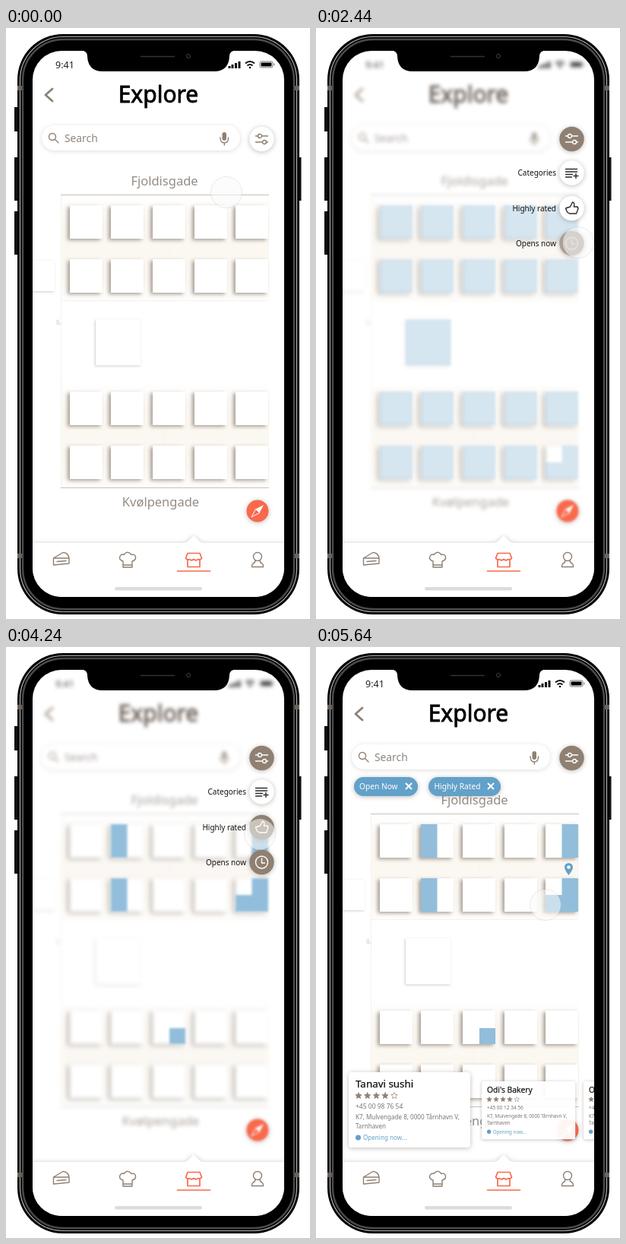
These frames come from a looping animation (400 by 777 pixels, 7.48 s). An HTML page:

```html
<!DOCTYPE html>
<html lang="en">
<head>
<meta charset="utf-8">
<title>Explore map filters</title>
<style>
html, body { margin: 0; width: 100%; height: 100%; overflow: hidden; background: #fff; }
svg { display: block; width: 400px; height: 777px; font-family: "Noto Sans", "Open Sans", sans-serif; }
.line { fill: none; stroke: #8f8072; stroke-width: 1.4; stroke-linecap: round; stroke-linejoin: round; }
.shadow { filter: drop-shadow(0 1px 3px rgba(60, 50, 40, .32)); }
.tiles { fill: #fff; filter: drop-shadow(-3px 2px 2.5px rgba(85, 72, 58, .5)); }
.faint { fill: #fff; filter: drop-shadow(-1px 1px 1.5px rgba(85, 72, 58, .28)); }
.blue { fill: #92bedb; }
.street { font-size: 16.5px; fill: #958b83; text-anchor: middle; }
.label { font-size: 10px; fill: #111; text-anchor: end; }
.small { font-size: 8.1px; fill: #777; }
</style>
</head>
<body>
<svg viewBox="0 0 400 777">
  <defs>
    <clipPath id="screen"><rect x="35" y="30" width="331" height="718" rx="38"/></clipPath>
    <linearGradient id="ground" x2="0" y2="1">
      <stop offset="0" stop-color="#fff"/><stop offset=".25" stop-color="#fbf7f1"/>
      <stop offset=".8" stop-color="#fbf7f1"/><stop offset="1" stop-color="#fefdfb"/>
    </linearGradient>
  </defs>

  <!-- phone body -->
  <path d="M13 104V136M13 170V227M13 241V298M386.500 170V227" stroke="#111" stroke-width="4"/>
  <rect x="15" y="8" width="371" height="763" rx="60"/>
  <g fill="none">
    <rect x="18.500" y="11.500" width="364" height="756" rx="57" stroke="#b5b5b5" stroke-width="1.200"/>
    <rect x="22" y="15" width="357" height="749" rx="53.500" stroke="#4a4a4a" stroke-width="2.500"/>
  </g>
  <path d="M15 79H21M380 79H386M15 694H21M380 694H386" stroke="#6d6259" stroke-width="6"/>
  <rect x="35" y="30" width="331" height="718" rx="38" fill="#fff"/>

  <g clip-path="url(#screen)">
    <g id="page">
      <text x="65" y="53" font-size="12.500" fill="#222">9:41</text>
      <path d="M294 53v-3M298 53v-5M302.500 53v-7M307 53v-9" stroke="#111" stroke-width="3"/>
      <path d="M315 46.500q6-5 12 0M317.500 49.500q3.500-3 7 0" fill="none" stroke="#111" stroke-width="2"/>
      <circle cx="321" cy="52" r="1.300"/>
      <rect x="334" y="44" width="17" height="8" rx="2" fill="none" stroke="#777"/>
      <rect x="335.500" y="45.500" width="14" height="5" rx="1"/><path d="M353 46.500v3" stroke="#777"/>
      <path d="M61 80L52 88L61 96" class="line" style="stroke-width:2.800"/>
      <text id="heading" x="200.500" y="98" font-size="30" stroke-width=".8" text-anchor="middle">Explore</text>

      <rect x="47" y="128" width="261" height="33" rx="16.500" fill="#fff" class="shadow" opacity=".5"/>
      <circle cx="61" cy="143" r="4.500" class="line"/><path d="M64.500 146.500L69 151" class="line"/>
      <text x="77" y="150" font-size="13.800" fill="#8f857d">Search</text>
      <rect x="284.500" y="137" width="5.500" height="11" rx="2.700" fill="#8f8072"/>
      <path d="M282 144q0 7 5.300 7t5.300-7M287.300 151v3" class="line"/>

      <rect x="73" y="222" width="273" height="136" fill="url(#ground)"/>
      <rect x="73" y="466" width="273" height="137" fill="url(#ground)"/>
      <path d="M72 219.500H346M72 604.500H346" stroke="#c8c0b8"/>
      <path d="M72.500 220V604M73 358.500H346M215.500 282V300M207.500 527V546" stroke="#f6f2ed" fill="none"/>
      <path d="M67 384v6M69 383v8M71 387v3" stroke="#ccc" stroke-width=".8"/>
      <text x="208.500" y="207" class="street">Fjoldisgade</text>
      <text x="203.500" y="629" class="street">Kvølpengade</text>
      <g class="tiles" id="tiles"></g>
      <g class="faint">
        <rect x="20" y="306" width="44" height="40"/>
        <rect x="118" y="383" width="59.500" height="60.500"/>
      </g>
    </g>

    <g id="blueMap">
      <path id="kept" class="blue" d="M138 233h21.500v44h-21.500zM323.500 233h21.500v44h-21.500zM138 304h21.500v44h-21.500zM302 326h21.500v-22h21.500v44h-43zM215 501h21v21h-21z"/>
      <g id="all" class="blue"></g>
    </g>

    <g id="compass">
      <circle cx="331" cy="635" r="14.500" fill="#f9694c" class="shadow"/>
      <path d="M339 627L333.500 637.500L328.500 632.500Z" fill="#fff"/>
      <path d="M323 643L328.500 632.500L333.500 637.500Z" fill="none" stroke="#fff"/>
    </g>

    <g id="results">
      <g fill="#62a1c9" class="shadow">
        <rect x="50" y="171" width="84" height="25" rx="12.500"/>
        <rect x="148" y="171" width="95" height="25" rx="12.500"/>
      </g>
      <g fill="#fff" font-size="10.200"><text x="57" y="187">Open Now</text><text x="155.500" y="187">Highly Rated</text></g>
      <path d="M118 179l8 8m0-8l-8 8M226 179l8 8m0-8l-8 8" stroke="#fff" stroke-width="2"/>
      <path d="M332.500 300Q327 293 327 289.500a5.500 5.500 0 0 1 11 0Q338 293 332.500 300Z" fill="#62a1c9"/>
      <circle cx="332.500" cy="289.500" r="2.300" fill="#fff"/>
      <g id="cards"></g>
    </g>

    <!-- tab bar -->
    <path d="M30 677H233Q238 677 241 673L245 669Q247 667 249 669L253 673Q256 677 261 677H372V760H30Z" fill="#fff" class="shadow"/>
    <g class="line">
      <path d="M62.500 697L75 689.500Q82 690 83 697ZM62.500 697V706L83 704V697M67 701.500L79 700.500"/>
      <path d="M154 701Q148 699 150 694.500Q152 691 155 692.500Q160 686 165 692.500Q169 691 170.500 695Q171 700 166 701V709H154ZM154 706H166"/>
      <circle cx="331" cy="695" r="5.500"/>
      <path d="M328 700Q328 703 325 704Q323 706 323.500 708.500H338.500Q339 706 337 704Q334 703 334 700"/>
      <path stroke="#f9694c" stroke-width="1.700" d="M239 690.500H255L257.500 697Q256 700 252.500 698.500Q250 701 247 698.500Q244 701 241.500 698.500Q238 700 236.500 697ZM239 700V708.500H255V700M225.500 714H268.500"/>
    </g>
    <rect x="143" y="735" width="115" height="4.500" rx="2.200" fill="#dcdcdc"/>

    <g id="menu"></g>
    <circle id="cursor" r="20.500" fill="rgba(250,250,250,.55)" stroke="rgba(0,0,0,.1)" stroke-width=".8"/>
  </g>

  <path d="M98 29Q107 30 107 37Q108 57 127 57H274Q293 57 294 37Q294 30 303 29Z"/>
  <path d="M177 37.500H222" stroke="#333" stroke-width="1.500"/>
  <circle cx="240" cy="37" r="2.500" fill="none" stroke="#444"/>
</svg>

<script>
const $ = id => document.getElementById(id);
const LOOP = 7480, STEP = 40;

// map tiles
const cols = [84, 138, 193, 248, 302], rows = [233, 304, 478, 549];
const rect = (x, y, w, h) => `<rect x="${x}" y="${y}" width="${w}" height="${h}"/>`;
const tiles = rows.flatMap(y => cols.map(x => rect(x, y, 43, 44)));
$('tiles').innerHTML = tiles.join('');
$('all').innerHTML = tiles.slice(0, -1).join('') + rect(118, 383, 59.5, 60.5) +
  '<path d="M302 571h21.500v-22h21.500v44h-43z"/>';

// result cards
function star(cx, cy, filled) {
  const pts = Array.from({ length: 10 }, (_, i) => {
    const a = i * Math.PI / 5, r = i % 2 ? 2 : 4.4;
    return `${cx + r * Math.sin(a)},${cy - r * Math.cos(a)}`;
  });
  return `<polygon points="${pts.join(' ')}" fill="${filled ? '#8f8072' : '#fff'}" stroke="#8f8072" stroke-width=".7"/>`;
}
const card = (x, y, scale, name, phone) => `
  <g transform="translate(${x} ${y}) scale(${scale})">
    <rect width="160" height="99" rx="4" fill="#fff" class="shadow" opacity="${scale < 1 ? .94 : 1}"/>
    <text x="9" y="20" font-size="13.400" fill="#111" stroke="#111" stroke-width=".25">${name}</text>
    ${[13, 24.7, 36.4, 48, 60].map((sx, i) => star(sx, 31, i < 4)).join('')}
    <text x="9" y="48" class="small" style="font-size:8.500px">${phone}</text>
    <text x="9" y="62" class="small">K7, Mulvengade 8, 0000 Tårnhavn V,</text>
    <text x="9" y="73.500" class="small">Tarnhaven</text>
    <circle cx="12.500" cy="86" r="3.500" fill="#62a1c9"/>
    <text x="19" y="89" class="small" style="fill:#62a1c9">Opening now...</text>
  </g>`;
$('cards').innerHTML =
  card(218, 571, .77, "Odi's Bakery", '+45 00 12 34 56') +
  card(352, 571, .77, 'Orvel Café', '+45 00 23 45 67') +
  card(43, 559, 1, 'Tanavi sushi', '+45 00 98 76 54');

// round buttons: y, label, icon, [active from, to], [shown from, to], [hidden from, to]
const buttons = [
  [146, '', '<path d="M-8-4h3M0-4h8M-8 4h9M6 4h2"/><circle cx="-2.500" cy="-4" r="2.500"/><circle cx="3.500" cy="4" r="2.500"/>', [680, 800]],
  [190.5, 'Categories', '<path d="M-8-5h15M-8-1.500h15M-8 2h9M-8 5.500h8M2.500 4h6M5.500 1v6"/>', null, [1120, 1200], [5400, 5480]],
  [237, 'Highly rated', '<path d="M-8 0L-2-2L1-8Q4-8 3-2H7Q9-1 8 2L6 7H-3L-6 5Z"/>', [3760, 3880], [1240, 1320], [5280, 5360]],
  [283, 'Opens now', '<circle r="8"/><path d="M0-5V1H4"/>', [2360, 2480], [1360, 1440], [5160, 5240]]
];
$('menu').innerHTML = buttons.map(([y, label, icon]) => `
  <g>
    <text x="316" y="${y + 3.5}" class="label">${label}</text>
    <g transform="translate(336.500 ${y})">
      <circle r="16.200" class="shadow"/><g class="line">${icon}</g>
    </g>
  </g>`).join('');
const buttonEls = [...$('menu').children];

const mix = (a, b, p) => a + (b - a) * p;
const mixColor = (a, b, p) => `rgb(${a.map((v, i) => Math.round(mix(v, b[i], p)))})`;
const WHITE = [255, 255, 255], BROWN = [143, 128, 114], DARK = [45, 42, 40];
const BLACK = [0, 0, 0], UMBER = [66, 52, 42];

// progress of a change whose first visible step falls on `from`
const ramp = (t, [from, to]) => Math.min(1, Math.max(0, (t - from + STEP) / (to - from + STEP)));

const moves = [
  [40, 520, 336, 146], [680, 1400, 366, 178], [1600, 2320, 345, 282],
  [3200, 3880, 337, 238], [4240, 4960, 302, 339]
];
function cursorAt(t) {
  let x = 290, y = 216;
  for (const [from, to, nx, ny] of moves) {
    const p = Math.sin(ramp(t, [from, to]) * Math.PI / 2);
    x = mix(x, nx, p);
    y = mix(y, ny, p);
  }
  return [x, y];
}

function draw(now) {
  let t = now % LOOP;
  t -= t % STEP;

  const blur = ramp(t, [680, 960]) - ramp(t, [5480, 5640]);
  const soften = (id, px) => $(id).style.filter = blur > 0 ? `blur(${px * blur}px)` : 'none';
  soften('page', 2.6);
  soften('blueMap', 1.5);
  soften('compass', 1.7);
  $('page').style.opacity = 1 - .2 * blur;
  $('heading').style.fill = $('heading').style.stroke = mixColor(BLACK, UMBER, blur);

  $('all').style.opacity = ramp(t, [2360, 2640]) - ramp(t, [3760, 4040]);
  $('kept').style.opacity = t >= 3760 ? 1 : 0;
  $('results').style.opacity = ramp(t, [5480, 5640]);

  buttons.forEach(([, label, , active, shown, hidden], i) => {
    const el = buttonEls[i], on = active ? ramp(t, active) : 0;
    el.style.opacity = shown ? ramp(t, shown) - ramp(t, hidden) : 1;
    el.querySelector('.shadow').style.fill = mixColor(WHITE, BROWN, on);
    el.querySelector('.line').style.stroke = mixColor(label ? DARK : BROWN, WHITE, on);
  });

  $('cursor').setAttribute('transform', `translate(${cursorAt(t)})`);
}

const start = performance.now();
(function frame() {
  draw(performance.now() - start);
  requestAnimationFrame(frame);
})();
</script>
</body>
</html>
```
